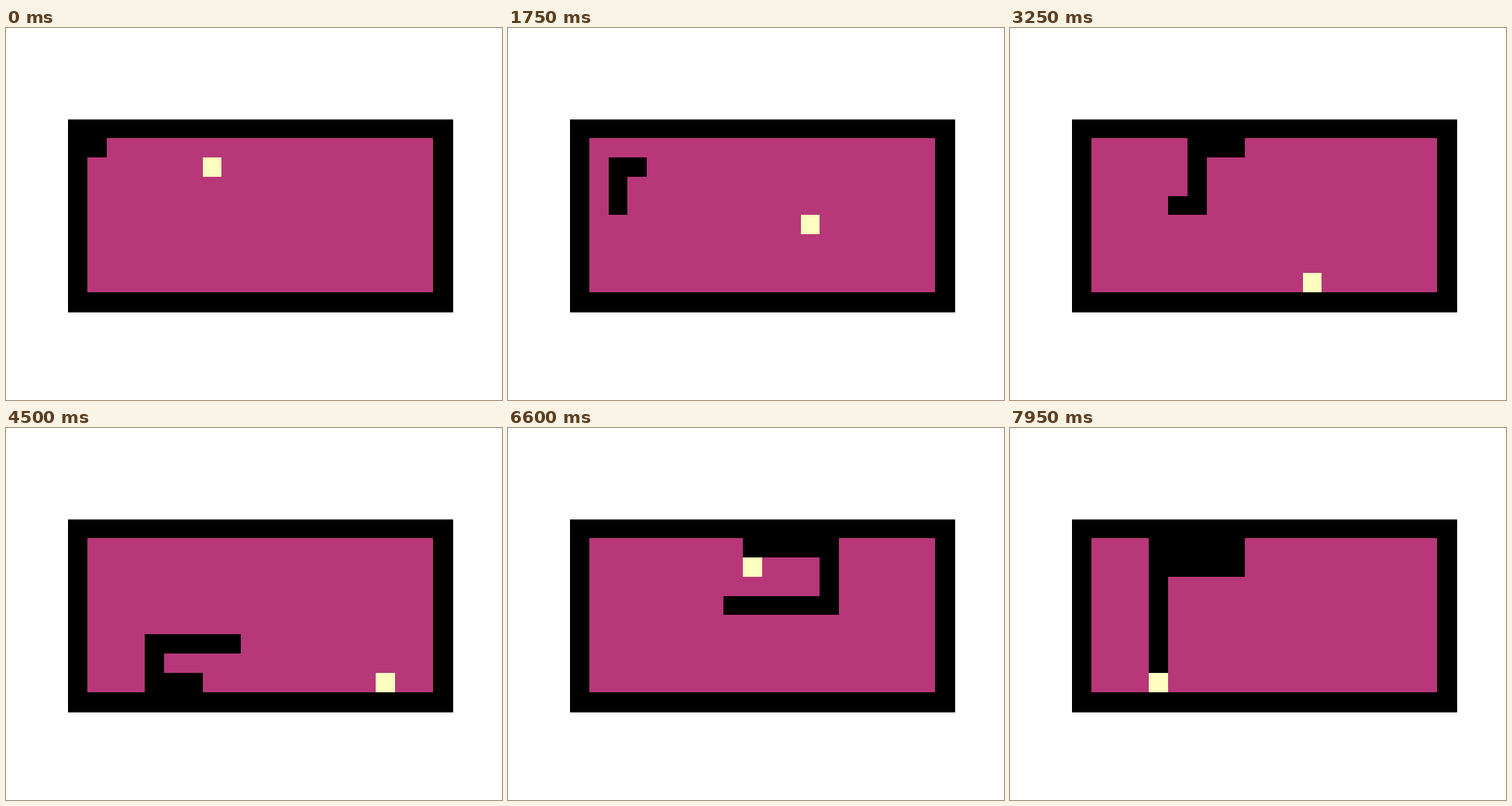
Animation, 640 px wide and 480 px high, one loop 8 s. Source, as an HTML page with a canvas:

```html
<!DOCTYPE html>
<html lang="en">
<head>
<meta charset="utf-8">
<title>Snake</title>
<style>
  html, body { margin: 0; width: 100%; height: 100%; overflow: hidden; background: #fff; }
  canvas { display: block; }
</style>
</head>
<body>
<canvas id="stage" width="640" height="480"></canvas>
<script>
const ctx = document.getElementById('stage').getContext('2d');
const STEP_MS = 50, STEPS = 160, CELL = 24.8;
const WALL = '#000', FLOOR = '#b73779', FOOD = '#fcfdbf';

// Stops in visiting order; a third entry marks a detour without food.
const stops = [
  [7, 2], [16, 4], [2, 2], [12, 5], [3, 4], [6, 1], [12, 8], [4, 6], [16, 8],
  [18, 5], [8, 6], [7, 4, 'detour'], [13, 1], [9, 2], [1, 1], [8, 2, 'detour'], [4, 8]
];

// The head moves sideways first, then up or down, one cell per step.
const path = [[1, 1]];
const meals = [];
for (const [col, row, detour] of stops) {
  let [x, y] = path[path.length - 1];
  while (x !== col || y !== row) {
    if (x !== col) x += Math.sign(col - x);
    else y += Math.sign(row - y);
    path.push([x, y]);
  }
  if (!detour) meals.push({ step: path.length - 1, cell: [col, row] });
}

const edgeX = col => Math.round(80 + CELL * col);
const edgeY = row => Math.round(117.4 + CELL * row);

function fillCells(col, row, cols, rows, color) {
  const x = edgeX(col), y = edgeY(row);
  ctx.fillStyle = color;
  ctx.fillRect(x, y, edgeX(col + cols) - x, edgeY(row + rows) - y);
}

function draw(step) {
  ctx.fillStyle = '#fff';
  ctx.fillRect(0, 0, 640, 480);
  ctx.fillStyle = WALL;
  ctx.fillRect(80, 118, 497, 249);
  fillCells(1, 1, 18, 8, FLOOR);

  const eaten = meals.filter(meal => meal.step <= step).length;
  const body = path.slice(Math.max(0, step - eaten), step + 1);
  for (const [col, row] of body) fillCells(col, row, 1, 1, WALL);
  fillCells(...meals[eaten].cell, 1, 1, FOOD);
}

function tick() {
  draw(Math.floor(performance.now() / STEP_MS) % STEPS);
  requestAnimationFrame(tick);
}
tick();
</script>
</body>
</html>
```
